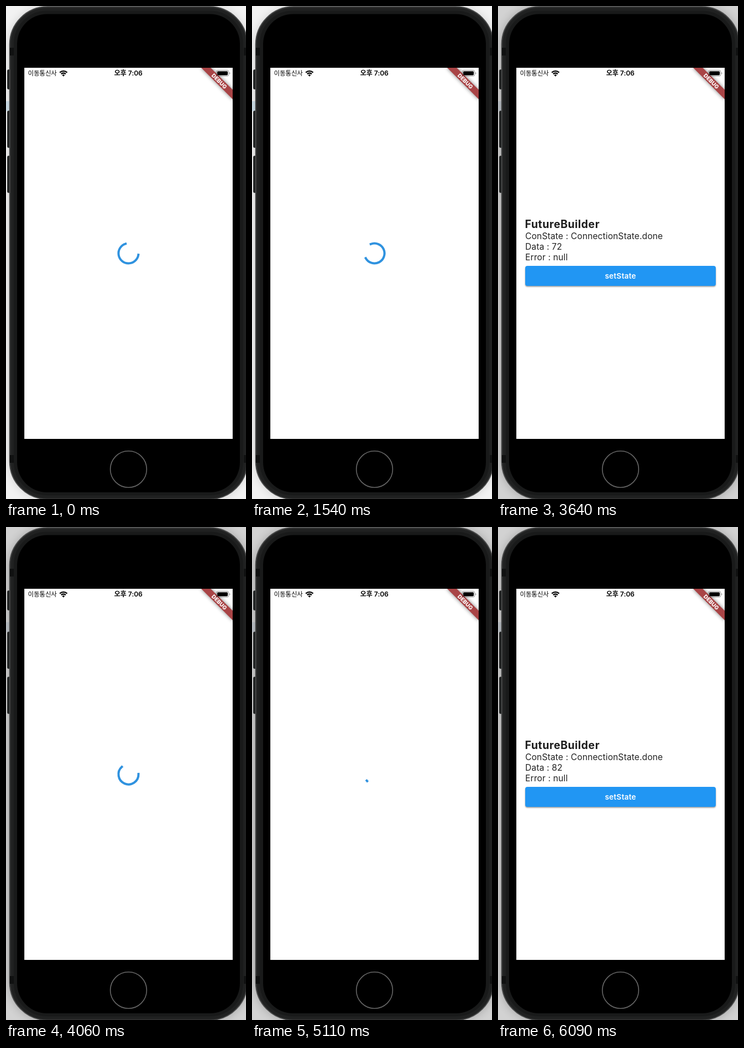
These frames come from a looping animation (432x886 px, 6.86 s). An HTML page:

```html
<!DOCTYPE html>
<html lang="ko">
<head>
<meta charset="utf-8">
<style>
  html, body { margin: 0; width: 100%; height: 100%; overflow: hidden; background: #ddd; }
  svg { display: block; width: 100vw; height: 100vh; }
  text { font-family: Inter, "Noto Sans CJK KR", "Noto Sans CJK", sans-serif; }
  .carrier { font-size: 11.3px; }
  .clock { font-size: 12px; font-weight: 600; }
  .debug { font-size: 9.8px; font-weight: 800; fill: #fff; }
  .title { font-size: 19.4px; font-weight: 700; letter-spacing: .5px; fill: #1d1d1d; }
  .body { font-size: 15.5px; letter-spacing: .12px; fill: #222; }
  .label { font-size: 13.6px; font-weight: 600; letter-spacing: .2px; fill: #fff; }
</style>
</head>
<body>
<svg viewBox="0 0 432 886" preserveAspectRatio="none">
  <defs>
    <filter id="halo" x="-10%" y="-10%" width="120%" height="120%"><feGaussianBlur stdDeviation="9"/></filter>
    <filter id="soft" x="-50%" y="-200%" width="200%" height="500%"><feGaussianBlur stdDeviation="3.9"/></filter>
    <filter id="lift" x="-5%" y="-20%" width="110%" height="150%"><feGaussianBlur stdDeviation="1.3"/></filter>
    <clipPath id="screen"><rect x="33" y="111" width="375" height="667"/></clipPath>
  </defs>

  <!-- desktop behind the phone -->
  <rect id="desk" width="432" height="886"/>
  <rect id="tint" y="171" width="7" height="18"/>
  <rect id="shade" x="6" y="1" width="429" height="886" rx="70" filter="url(#halo)"/>

  <!-- phone body -->
  <g fill="#1d1f1f" stroke="#3b3d3d">
    <rect x="2.5" y="114.5" width="8" height="35" rx="2"/>
    <rect x="2.5" y="188.5" width="8" height="66" rx="2"/>
    <rect x="2.5" y="269.5" width="8" height="66" rx="2"/>
  </g>
  <rect x="6.5" y="1" width="428" height="885.5" rx="68" fill="#2c2d2d" stroke="#4b4c4c" stroke-width="1.5"/>
  <rect x="11.5" y="6" width="418" height="876" rx="62" fill="#191a1a" stroke="#202121" stroke-width="5"/>
  <g fill="#101111">
    <rect x="7" y="75" width="7" height="14"/>
    <rect x="7" y="807" width="7" height="14"/>
    <rect x="428" y="75" width="4" height="14"/>
    <rect x="428" y="807" width="4" height="14"/>
  </g>
  <rect x="20" y="14.5" width="401" height="859.5" rx="54"/>
  <circle cx="220.5" cy="832.5" r="32.7" fill="none" stroke="#666" stroke-width="1.6"/>
  <rect x="33" y="111" width="375" height="667" fill="#fff"/>

  <!-- app -->
  <path id="spinner" fill="none" stroke="#2f92df" stroke-width="4" stroke-linecap="square"/>
  <g id="result">
    <text class="title" x="48.5" y="399">FutureBuilder</text>
    <text class="body" x="49" y="419">ConState : ConnectionState.done</text>
    <text class="body" x="49" y="438" id="data"></text>
    <text class="body" x="49" y="457">Error : null</text>
    <rect x="49" y="469" width="343" height="35.5" rx="4" fill="#000" opacity=".42" filter="url(#lift)"/>
    <rect x="49" y="467" width="343" height="36" rx="4" fill="#2196f3"/>
    <text class="label" x="220.5" y="490" text-anchor="middle">setState</text>
  </g>

  <g clip-path="url(#screen)">
    <g transform="translate(408 111) rotate(45)">
      <rect x="-40" y="28" width="80" height="12" opacity=".5" filter="url(#soft)"/>
      <rect x="-45" y="28" width="90" height="12" fill="#a94446"/>
      <text class="debug" y="37.6" text-anchor="middle">DEBUG</text>
    </g>
  </g>

  <!-- status bar -->
  <text class="carrier" x="39.5" y="125.2">이동통신사</text>
  <g fill="none" stroke="#000" stroke-width="2.3">
    <path d="M96.8 119.6A9.4 9.4 0 0 1 110 119.6M99.3 122.2A5.8 5.8 0 0 1 107.5 122.2"/>
    <path d="M103.4 126.8L101 124.3A3.4 3.4 0 0 1 105.8 124.3Z" fill="#000" stroke="none"/>
  </g>
  <text class="clock" x="220.3" y="125.4" text-anchor="middle">오후 7:06</text>
  <rect x="378.5" y="115.5" width="22.5" height="10.5" rx="3" fill="none" stroke="#000" stroke-opacity=".4"/>
  <rect x="380.2" y="117.2" width="19" height="7.2" rx="1.6"/>
  <path d="M402.2 119v3.6q1.3-.4 1.3-1.8t-1.3-1.8z" fill="#000" opacity=".4"/>
</svg>
<script>
  const LOOP = 6860, STEP = 70;
  const FIRST_DONE = 1750, DESK_CHANGE = 3640, RELOAD = 3710, SECOND_DONE = 5810;
  const el = id => document.getElementById(id);
  const clamp = v => Math.min(1, Math.max(0, v));

  // cubic-bezier(.4, 0, .2, 1), solved by bisection
  function fastOutSlowIn(x) {
    if (x <= 0 || x >= 1) return clamp(x);
    let lo = 0, hi = 1;
    for (let i = 0; i < 24; i++) {
      const s = (lo + hi) / 2, r = 1 - s;
      if (1.2 * r * r * s + 0.6 * r * s * s + s * s * s < x) lo = s; else hi = s;
    }
    return lo * lo * (3 - 2 * lo);
  }

  // Indeterminate arc: 1333 ms stretch cycle, 2222 ms rotation
  function arcPath(ms) {
    const cycle = (ms / 1333) % 1;
    const head = fastOutSlowIn(clamp(cycle * 2));
    const tail = fastOutSlowIn(clamp(cycle * 2 - 1));
    const start = Math.PI * (-0.5 + 1.5 * tail + 2 * ms / 2222 + 0.5 * cycle);
    const sweep = Math.max(1.5 * Math.PI * (head - tail), 0.01);
    const at = a => `${220.5 + 18 * Math.cos(a)} ${444.5 + 18 * Math.sin(a)}`;
    return `M${at(start)}A18 18 0 ${sweep > Math.PI ? 1 : 0} 1 ${at(start + sweep)}`;
  }

  function draw(now) {
    const t = Math.floor((now % LOOP) / STEP) * STEP;
    const second = t >= RELOAD;
    const loading = t < FIRST_DONE || (second && t < SECOND_DONE);
    const dimmed = t >= DESK_CHANGE;

    el('spinner').style.display = loading ? '' : 'none';
    el('result').style.display = loading ? 'none' : '';
    if (loading) el('spinner').setAttribute('d', arcPath(second ? 49 + (t - RELOAD) / 1.05 : 428 + t * 0.933));
    el('data').textContent = `Data : ${second ? 82 : 72}`;

    el('desk').setAttribute('fill', dimmed ? '#d2d2d2' : '#f2f2f2');
    el('tint').setAttribute('fill', dimmed ? '#c0c6cc' : '#cfe0ea');
    el('shade').setAttribute('opacity', dimmed ? 0.24 : 0.14);
  }

  function tick(now) {
    draw(now);
    requestAnimationFrame(tick);
  }
  draw(0);
  requestAnimationFrame(tick);
</script>
</body>
</html>
```
